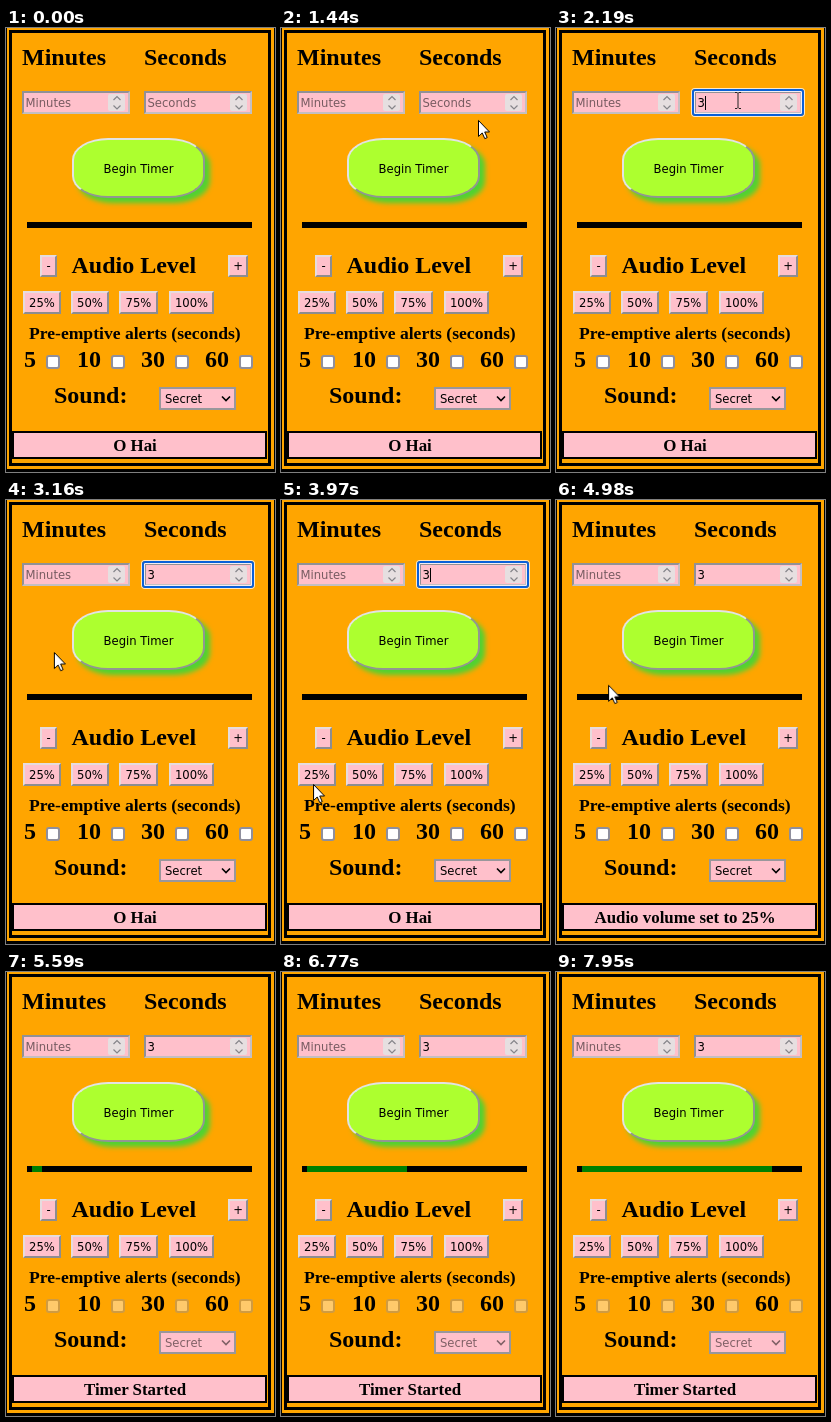
These frames come from a looping animation (269x444 px, 8 s). An HTML page:

```html
<!DOCTYPE html>
<html lang="en">
<head>
<meta charset="utf-8">
<title>Timer</title>
<style>
html, body { margin: 0; width: 100%; height: 100%; overflow: hidden; background: #ffa500; }
#stage { position: relative; width: 269px; height: 444px; overflow: hidden; background: #ffa500; }
#stage div, svg { position: absolute; box-sizing: border-box; }
svg { left: 0; top: 0; overflow: visible; }

/* every animated part shares one 8 s clock */
.a { animation: 8s step-end infinite; }

.line { background: #000; }
.btn, .field {
  left: var(--x); top: var(--y); width: var(--w); height: var(--h);
  background: #ffc0cb; border: 2px solid;
}
.btn { border-color: #e6dcde #8d8d90 #8d8d90 #e6dcde; }
.field { border-color: #919196 #c4bfc1 #c4bfc1 #919196; }
.select { border-color: #99979b; }
.row { --y: 263px; --h: 23px; }
.level { --y: 227px; --h: 22px; }
.number { --y: 63px; --w: 108px; --h: 23px; }
.spin { right: 3px; top: 1px; width: 17px; height: 17px; background: #e6dfe0; border-radius: 2px; }
.begin {
  left: 66px; top: 110px; width: 133px; height: 60px;
  background: #adff2f; border: 2px solid;
  border-color: #e3e3e3 #929692 #929692 #e3e3e3;
  border-radius: 36px / 22px;
  box-shadow: 5px 5px 5px #4fd332;
}
.ring {
  left: 136px; top: 61px; width: 112px; height: 27px;
  border: 2px solid #0a60d8; border-radius: 3px;
  box-shadow: 0 0 0 1px #ffe9c4, inset 0 0 0 1px #f4eef2;
}
.check { top: 327px; width: 14px; height: 14px; background: #fff; border: 2px solid #8f8f9d; border-radius: 3px; }
.status { left: 6px; top: 403px; width: 255px; height: 28px; background: #ffc0cb; border: 2px solid #000; }
.bar { left: 26px; top: 194px; height: 6px; width: 0; background: #008000;
  animation: fill 8s linear infinite; }

.serif { font: bold 24px "Liberation Serif", "Times New Roman", serif; }
.alerts { font-size: 17.6px; }
.msg { font-size: 16.9px; text-anchor: middle; }
.ui { font: 11.6px "DejaVu Sans", sans-serif; }
.mid { text-anchor: middle; }
.hint { fill: #775b61; }

.ring { animation-name: ring; }
.empty { animation-name: empty; }
.typed { animation-name: typed; }
.caret { animation-name: caret; }
.caret0 { animation-name: caret0; }
.press { animation-name: press; }
.start { animation-name: start; }
.hello { animation-name: hello; }
.volume { animation-name: volume; }
.started { animation-name: started; }
.check.a { animation-name: off; }
.choice { animation-name: dim; }
.arrow { animation-name: arrow; }
.beam { animation-name: beam; }
#mouse { left: 0; top: 0; animation: move 8s linear infinite; }

@keyframes ring { 0%, 52.125% { opacity: 0 } 24.875% { opacity: 1 } }
@keyframes empty { 0% { opacity: 1 } 27.375%, 100% { opacity: 0 } }
@keyframes typed { 0% { opacity: 0 } 27.375%, 100% { opacity: 1 } }
@keyframes caret0 { 0%, 27.375%, 100% { opacity: 0 } 24.875% { opacity: 1 } }
@keyframes caret { 0%, 33.1%, 52.125%, 100% { opacity: 0 } 27.375%, 43.3% { opacity: 1 } }
@keyframes press {
  0%, 53.75%, 100% { border-color: #e6dcde #8d8d90 #8d8d90 #e6dcde }
  52.125% { border-color: #8d8d90 #e6dcde #e6dcde #8d8d90 }
}
@keyframes start {
  0%, 65.75%, 100% { border-color: #e3e3e3 #929692 #929692 #e3e3e3 }
  64.75% { border-color: #929692 #e3e3e3 #e3e3e3 #929692 }
}
@keyframes hello { 0% { opacity: 1 } 53.75%, 100% { opacity: 0 } }
@keyframes volume { 0%, 65.75%, 100% { opacity: 0 } 53.75% { opacity: 1 } }
@keyframes started { 0% { opacity: 0 } 65.75%, 100% { opacity: 1 } }
@keyframes off { 0% { opacity: 1 } 65.75%, 100% { opacity: .42 } }
@keyframes dim { 0% { opacity: 1 } 65.75%, 100% { opacity: .5 } }
@keyframes arrow { 0%, 18.9%, 68.25%, 100% { opacity: 0 } 12%, 32.5% { opacity: 1 } }
@keyframes beam { 0%, 32.5%, 100% { opacity: 0 } 18.9% { opacity: 1 } }
@keyframes fill {
  0% { width: 0 }
  68.225% { width: 0; animation-timing-function: steps(39) }
  99.9125%, 100% { width: 195px }
}
@keyframes move {
  0%, 12% { transform: translate(251px, 129px) }
  18% { transform: translate(197px, 92px) }
  21.5%, 31.5% { transform: translate(182px, 73px) }
  39.5% { transform: translate(48px, 152px) }
  41.125% { transform: translate(30px, 157px) }
  43% { transform: translate(24px, 180px) }
  47.5% { transform: translate(28px, 288px) }
  49.625% { transform: translate(32px, 284px) }
  50.5%, 57.2% { transform: translate(33px, 281px) }
  62.25% { transform: translate(52px, 185px) }
  64.5%, 65.6% { transform: translate(72px, 143px) }
  67.375%, 100% { transform: translate(43px, 143px) }
}
</style>
</head>
<body>
<div id="stage">
  <div class="line" style="left:0;top:0;width:1px;height:444px"></div>
  <div class="line" style="left:268px;top:0;width:1px;height:444px"></div>
  <div class="line" style="left:0;top:441px;width:269px;height:3px"></div>
  <div style="left:3px;top:2px;width:262px;height:436px;border:3px solid #000"></div>

  <div class="field number" style="--x:16px"><div class="spin"></div></div>
  <div class="field number" style="--x:138px"><div class="spin"></div></div>
  <div class="ring a"></div>

  <div class="begin start a"></div>
  <div class="line" style="left:21px;top:194px;width:225px;height:6px"></div>
  <div class="bar"></div>

  <div class="btn level" style="--x:34px;--w:17px"></div>
  <div class="btn level" style="--x:222px;--w:20px"></div>
  <div class="btn row press a" style="--x:17px;--w:38px"></div>
  <div class="btn row" style="--x:65px;--w:38px"></div>
  <div class="btn row" style="--x:113px;--w:39px"></div>
  <div class="btn row" style="--x:163px;--w:45px"></div>

  <div class="check a" style="left:40px"></div>
  <div class="check a" style="left:105px"></div>
  <div class="check a" style="left:169px"></div>
  <div class="check a" style="left:233px"></div>
  <div class="field select" style="--x:153px;--y:359px;--w:77px;--h:23px"></div>
  <div class="status"></div>

  <svg width="269" height="444">
    <g class="serif">
      <text x="16" y="37">Minutes</text>
      <text x="138" y="37">Seconds</text>
      <text x="65.5" y="245">Audio Level</text>
      <text class="alerts" x="23" y="311">Pre-emptive alerts (seconds)</text>
      <text x="18" y="339">5</text>
      <text x="71" y="339">10</text>
      <text x="135" y="339">30</text>
      <text x="199" y="339">60</text>
      <text x="48" y="375">Sound:</text>
      <text class="msg hello a" x="129" y="423">O Hai</text>
      <text class="msg volume a" x="129" y="423">Audio volume set to 25%</text>
      <text class="msg started a" x="129" y="423">Timer Started</text>
    </g>
    <g class="ui">
      <text class="hint" x="19.5" y="79">Minutes</text>
      <text class="hint empty a" x="141.5" y="79">Seconds</text>
      <text class="typed a" x="141.5" y="79">3</text>
      <text class="mid" x="132.5" y="145">Begin Timer</text>
      <text class="mid" x="42.5" y="242">-</text>
      <text class="mid" x="232" y="242">+</text>
      <text class="mid" x="36" y="279">25%</text>
      <text class="mid" x="84" y="279">50%</text>
      <text class="mid" x="132.5" y="279">75%</text>
      <text class="mid" x="185.5" y="279">100%</text>
      <g class="choice a">
        <text x="159" y="375">Secret</text>
        <path d="M216 368.5l4 4 4-4" fill="none" stroke="#000" stroke-width="1.6"/>
      </g>
    </g>
    <g fill="none" stroke="#85858a" stroke-width="1.2">
      <path id="spin" d="M107.5 72l3.5-3.5 3.5 3.5M107.5 77.500l3.500 3.500 3.500-3.500"/>
      <use href="#spin" x="122"/>
    </g>
    <rect class="caret0 a" x="142" y="68" width="1" height="14"/>
    <rect class="caret a" x="149" y="68" width="1" height="14"/>
  </svg>

  <div id="mouse">
    <svg width="14" height="21">
      <path class="arrow a" d="M.5 .5V16.500L4.200 13L6.800 18.700L9.200 17.600L6.700 12H11.500Z" fill="#fff" stroke="#000"/>
      <path class="beam a" d="M-3 -8.500H-1L0 -7.500L1 -8.500H3M0 -7.500V6.500M-3 7.500H-1L0 6.500L1 7.500H3" fill="none" stroke="#222"/>
    </svg>
  </div>
</div>
</body>
</html>
```
